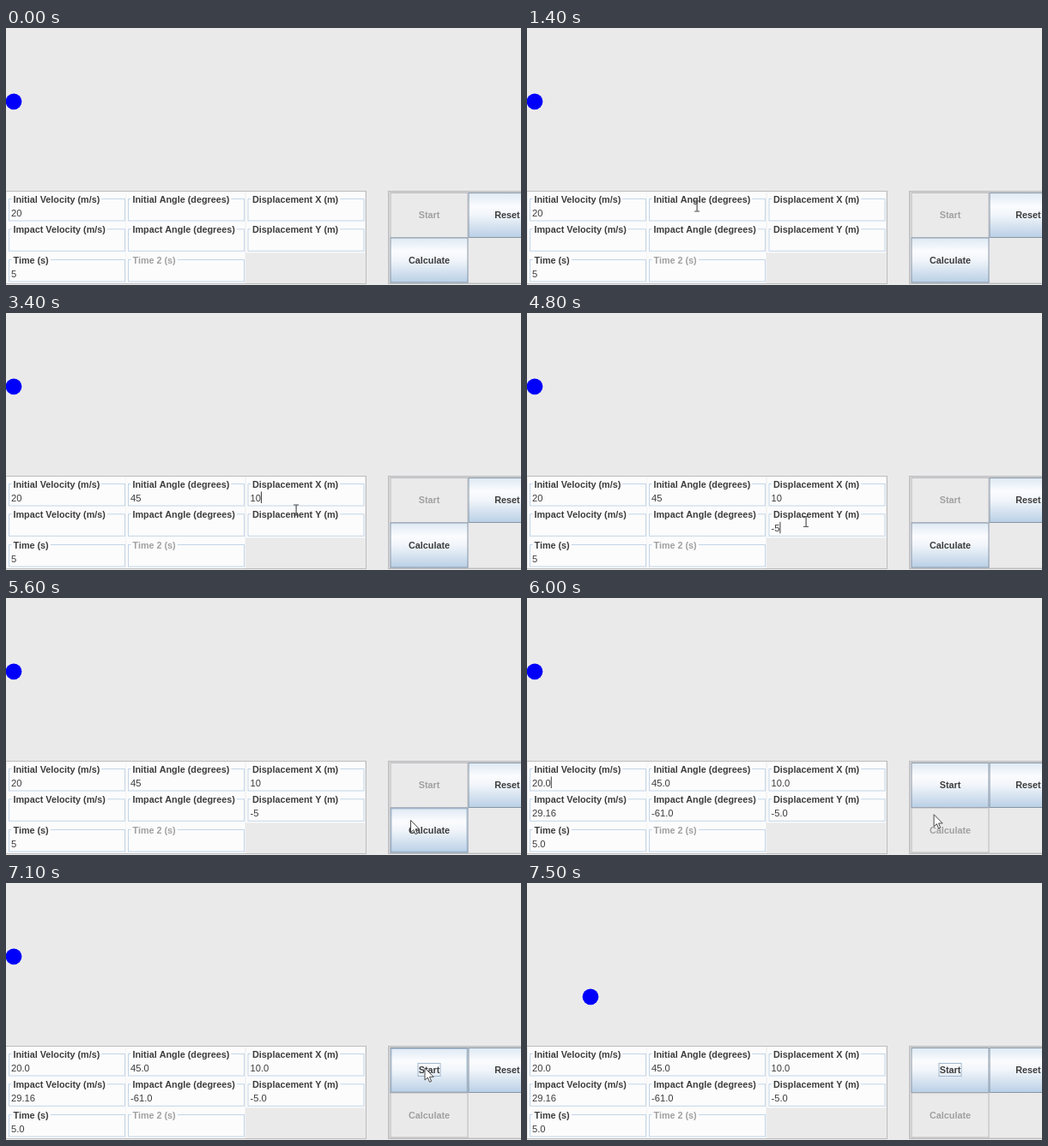
An HTML page with a canvas for the animation above (7600 ms loop, 600 px wide and 300 px high).

```html
<!DOCTYPE html>
<html lang="en">
<head>
<meta charset="utf-8">
<title>Projectile calculator</title>
<style>
html, body { margin: 0; width: 100%; height: 100%; overflow: hidden; background: #ebeaeb; }
canvas { display: block; }
</style>
</head>
<body>
<canvas id="stage" width="600" height="300"></canvas>
<script>
const ctx = document.getElementById('stage').getContext('2d');
const LOOP = 7600, STEP = 100;
const BG = '#ebeaeb', INK = '#3c3c3c', MUTED = '#a0a0a0', RULE = '#c3d5e7';
const SANS = '"Liberation Sans", Arial, sans-serif';
const LABEL = `bold 10.8px ${SANS}`, VALUE = `11.2px ${SANS}`;
const COLS = [2, 141, 280.5], ROWS = [191, 226.3, 262];

// Mouse path: time, x, y
const PATH = [
  [0, 612, 262], [800, 530, 228], [1400, 198, 208], [2000, 198, 208],
  [2400, 338, 214], [3100, 338, 214], [3400, 338, 230], [3500, 326, 243],
  [3700, 326, 243], [3800, 325, 243.5], [5100, 325, 243.5], [5600, 471.5, 259.5],
  [5900, 471.5, 259.5], [6300, 488, 216], [7100, 488, 216], [7500, 488, 306]
];

// Caret visibility: from, to, column, row
const CARETS = [
  [1700, 2500, 1, 0], [2500, 3500, 2, 0], [3500, 4000, 2, 1], [4500, 5300, 2, 1],
  [5700, 6300, 0, 0], [6800, 7000, 0, 0]
];

function mouseAt(t) {
  const i = PATH.findIndex(p => p[0] > t);
  if (i < 0) return PATH[PATH.length - 1].slice(1);
  const [t0, x0, y0] = PATH[i - 1], [t1, x1, y1] = PATH[i];
  const u = (t - t0) / (t1 - t0), e = u * u * (3 - 2 * u);
  return [x0 + (x1 - x0) * e, y0 + (y1 - y0) * e];
}

// Text whose characters appear at the given times
const typed = (t, text, ...times) => text.slice(0, times.filter(at => t >= at).length);

function valuesAt(t) {
  if (t >= 5700) return [['20.0', '45.0', '10.0'], ['29.16', '-61.0', '-5.0'], ['5.0', '']];
  return [
    ['20', typed(t, '45', 1900, 2000), typed(t, '10', 3000, 3100)],
    ['', '', typed(t, '-5', 4600, 4800)],
    ['5', '']
  ];
}

function box(x, y, w, h, color) {
  ctx.fillStyle = color;
  ctx.fillRect(x, y, w, h);
}

function frame(x, y, w, h, color, width = 1) {
  ctx.strokeStyle = color;
  ctx.lineWidth = width;
  ctx.strokeRect(x, y, w, h);
}

function write(text, x, y, font, color, align = 'left') {
  ctx.font = font;
  ctx.fillStyle = color;
  ctx.textAlign = align;
  ctx.fillText(text, x, y);
}

function field(label, value, col, row, enabled = true) {
  const x = COLS[col], y = ROWS[row];
  box(x - 1, y, 138.5, 36, '#fcfcfd');
  frame(x + 1.5, y + 8.5, 135, 25.5, RULE);
  ctx.font = LABEL;
  box(x + 4.5, y + 6, ctx.measureText(label).width + 4, 6, '#fcfcfd');
  write(label, x + 6.5, y + 12.5, LABEL, enabled ? INK : MUTED);
  write(value, x + 4, y + 28.8, VALUE, INK);
}

function fieldPanel(t) {
  const labels = [
    ['Initial Velocity (m/s)', 'Initial Angle (degrees)', 'Displacement X (m)'],
    ['Impact Velocity (m/s)', 'Impact Angle (degrees)', 'Displacement Y (m)'],
    ['Time (s)', 'Time 2 (s)']
  ];
  const values = valuesAt(t);
  labels.forEach((line, r) => line.forEach((label, c) =>
    field(label, values[r][c], c, r, label !== 'Time 2 (s)')));
  frame(-0.5, 190.5, 420, 108, '#bcbcbe');

  const caret = CARETS.find(([from, to]) => t >= from && t < to);
  if (caret) {
    const [, , c, r] = caret;
    ctx.font = VALUE;
    const x = COLS[c] + 4 + ctx.measureText(values[r][c]).width;
    box(x, ROWS[r] + 17.5, 1, 13.5, INK);
  }
}

function button(text, x, y, { enabled = true, hover, pressed, focus } = {}) {
  const w = 91, h = 53;
  if (enabled) {
    const g = ctx.createLinearGradient(0, y, 0, y + h);
    g.addColorStop(0, '#dde8f3');
    g.addColorStop(0.3, '#fbfcfe');
    g.addColorStop(0.5, '#f1f5fa');
    g.addColorStop(1, '#b8cfe5');
    box(x, y, w, h, pressed ? '#b8cfe5' : g);
    if (hover) frame(x + 1.5, y + 1.5, w - 3, h - 3, '#a9c0d8');
  }
  frame(x + 0.5, y + 0.5, w - 1, h - 1, enabled ? '#8796a5' : '#b9b9bc');
  write(text, x + w / 2, y + 30.2, LABEL, enabled ? INK : MUTED, 'center');
  if (focus) frame(x + 32.5, y + 18.5, 26, 15, '#a3b8cc');
}

function buttonPanel(t, [mx, my]) {
  const solved = t >= 5700;
  const over = (x, y) => mx >= x && mx < x + 91 && my >= y && my < y + 53;
  frame(445.5, 190.5, 160, 108, '#bcbcbe');
  frame(446.5, 191.5, 160, 106, '#d5d4d6');
  button('Start', 447.5, 192, {
    enabled: solved, hover: over(447.5, 192),
    pressed: t >= 7000 && t < 7100, focus: t >= 7000
  });
  button('Reset', 538.5, 192, { hover: over(538.5, 192) });
  button('Calculate', 447.5, 244.5, { enabled: !solved, hover: over(447.5, 244.5) });
}

function ball(t) {
  const dx = Math.max(0, t - 7100) / 400 * 65;
  ctx.fillStyle = '#0000fa';
  ctx.beginPath();
  ctx.arc(9 + dx, 85.8 - 0.8136 * dx + 0.02364 * dx * dx, 9.4, 0, Math.PI * 2);
  ctx.fill();
}

function pointer([x, y]) {
  ctx.save();
  ctx.translate(x, y);
  if (x < 420 && y > 191) {
    box(-0.5, -6, 1.2, 12, '#555');
    box(-3, -6.5, 6, 1, '#555');
    box(-3, 5.5, 6, 1, '#555');
  } else {
    ctx.scale(0.88, 0.88);
    const arrow = new Path2D('M0 0V16L3.7 12.5L6.3 18.5L8.7 17.5L6.2 11.7H11.5Z');
    ctx.fillStyle = '#fff';
    ctx.fill(arrow);
    ctx.strokeStyle = '#444';
    ctx.lineWidth = 1.1;
    ctx.stroke(arrow);
  }
  ctx.restore();
}

function draw(now) {
  const t = Math.floor((now % LOOP) / STEP) * STEP;
  const mouse = mouseAt(t);
  box(0, 0, 600, 300, BG);
  ball(t);
  fieldPanel(t);
  buttonPanel(t, mouse);
  pointer(mouse);
}

const start = performance.now();
function tick() {
  draw(performance.now() - start);
  requestAnimationFrame(tick);
}
tick();
</script>
</body>
</html>
```
